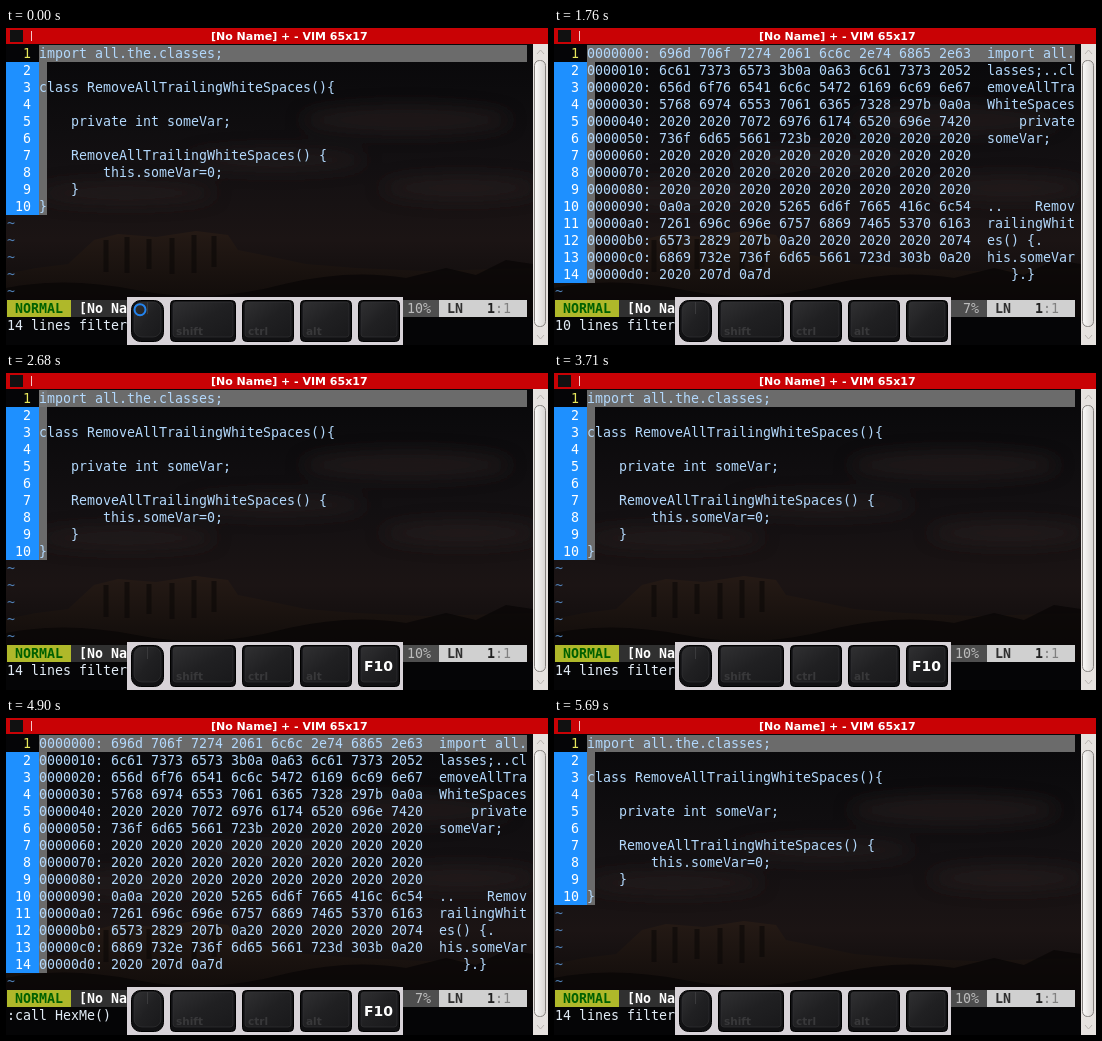
An HTML page for the animation above (5880 ms loop, 542 by 317 pixels).

```html
<!DOCTYPE html>
<html lang="en">
<head>
<meta charset="utf-8">
<title>Hex view toggle</title>
<style>
html, body { margin: 0; width: 100%; height: 100%; overflow: hidden; background: #000; }
svg { display: block; }
.mono { font: 13.29px "DejaVu Sans Mono", monospace; }
.bold { font-weight: bold; }
.sans { font: bold 11px "DejaVu Sans", sans-serif; }
</style>
</head>
<body>
<svg id="stage" width="542" height="317" viewBox="0 0 542 317">
  <defs>
    <linearGradient id="sky" x2="0" y2="1">
      <stop offset="0" stop-color="#08080a"/>
      <stop offset=".45" stop-color="#131012"/>
      <stop offset=".72" stop-color="#1b1414"/>
      <stop offset="1" stop-color="#0b0909"/>
    </linearGradient>
    <linearGradient id="cliff" x2="0" y2="1">
      <stop offset="0" stop-color="#251a15"/>
      <stop offset="1" stop-color="#0c0908"/>
    </linearGradient>
    <linearGradient id="cap" x2="1" y2="1">
      <stop offset="0" stop-color="#303032"/>
      <stop offset=".5" stop-color="#202022"/>
      <stop offset="1" stop-color="#19191b"/>
    </linearGradient>
    <linearGradient id="thumb">
      <stop offset="0" stop-color="#fbfaf9"/>
      <stop offset="1" stop-color="#d9d6d3"/>
    </linearGradient>
    <filter id="soft" x="-30%" y="-50%" width="160%" height="200%"><feGaussianBlur stdDeviation="9"/></filter>
  </defs>

  <rect width="542" height="317" fill="#000"/>
  <g id="scene">
    <rect y="16" width="527" height="273" fill="url(#sky)"/>
    <g filter="url(#soft)" fill="#2a2222" opacity=".6">
      <ellipse cx="400" cy="92" rx="105" ry="13"/>
      <ellipse cx="270" cy="132" rx="90" ry="10"/>
      <ellipse cx="455" cy="160" rx="80" ry="11"/>
      <ellipse cx="120" cy="165" rx="90" ry="10"/>
    </g>
    <path d="M0 246L30 240 62 236 88 212 112 206 150 209 190 203 222 207 232 222 262 228 300 236 350 240 420 243 527 240V289H0Z" fill="url(#cliff)"/>
    <path d="M100 212v32M121 209v36M143 211v30M166 210v36M188 207v38M208 208v31" stroke="#0b0807" stroke-width="5" opacity=".6"/>
    <path d="M0 260Q60 248 130 262T270 258 400 250L440 240 470 247 500 232 527 236V289H0Z" fill="#080606" opacity=".75"/>
  </g>

  <rect width="542" height="16" fill="#c90205"/>
  <rect x="4" y="2" width="13" height="12" fill="#111"/>
  <path d="M25.5 3v10" stroke="#f4c8c8"/>
  <text class="sans" x="205" y="12" fill="#fff">[No Name] + - VIM 65x17</text>

  <rect x="33" y="17" width="488" height="17" fill="#6b6b6b"/>
  <rect id="cursor" x="33" y="17" width="8" height="17" fill="#747474"/>
  <rect y="16" width="33" height="18" fill="#050507"/>
  <g id="views"></g>

  <rect x="1" y="272" width="64" height="17" fill="#afb82a"/>
  <rect x="65" y="272" width="368" height="17" fill="#4e4e4e"/>
  <rect x="65" y="272" width="58" height="17" fill="#303030"/>
  <rect x="433" y="272" width="88" height="17" fill="#d0d0d0"/>
  <rect y="289" width="527" height="28" fill="#050506"/>
  <g id="status"></g>

  <rect x="527" y="16" width="15" height="301" fill="#e6e2df"/>
  <rect x="528.5" y="32.5" width="11" height="266" rx="5" fill="url(#thumb)" stroke="#85817e"/>
  <path d="M531 26l3.500-4 3.500 4M531 307l3.500 4 3.500-4" fill="none" stroke="#bbb6b2"/>

  <rect x="121" y="269" width="276" height="48" fill="#d8d3d8"/>
  <g id="keys"></g>
  <path d="M141.500 274v12" stroke="#3a3a3c"/>
  <circle id="click" cx="134" cy="281.700" r="5.500" fill="none" stroke="#2484ee" stroke-width="2"/>
  <text id="pressed" class="sans" x="372.500" y="298" text-anchor="middle" fill="#fff" style="font-size:14px">F10</text>
</svg>
<script>
const LOOP = 5880, CELL = 8, ROW = 17;
const $ = id => document.getElementById(id);

function add(parent, tag, attrs, text) {
  const el = document.createElementNS('http://www.w3.org/2000/svg', tag);
  for (const k in attrs) el.setAttribute(k, attrs[k]);
  if (text) el.textContent = text;
  return parent.appendChild(el);
}

// Each word sits on the terminal grid.
function mono(parent, str, col, row, fill, bold) {
  const line = add(parent, 'text', { class: bold ? 'mono bold' : 'mono', y: 13 + ROW * row, fill });
  for (const m of str.matchAll(/\S+/g))
    add(line, 'tspan', { x: 1 + CELL * (col + m.index) }, m[0]);
  return line;
}

const name = 'RemoveAllTrailingWhiteSpaces';
const code = `import all.the.classes;\n\nclass ${name}(){\n\n    private int someVar;` +
  ' '.repeat(56) + `\n\n    ${name}() {\n        this.someVar=0;\n    }\n}`;

function hexDump(str) {
  const lines = [];
  for (let i = 0; i < str.length; i += 16) {
    const part = str.slice(i, i + 16);
    const hex = [...part].map((c, k) =>
      c.charCodeAt(0).toString(16).padStart(2, '0') + (k % 2 ? ' ' : '')).join('');
    lines.push(i.toString(16).padStart(7, '0') + ': ' + hex.padEnd(41) + part.replace(/\n/g, '.').slice(0, 11));
  }
  return lines;
}

function makeView(lines, percent) {
  const g = add($('views'), 'g', {}), n = lines.length;
  add(g, 'rect', { y: 34, width: 33, height: ROW * (n - 1), fill: '#1e90ff' });
  add(g, 'rect', { x: 33, y: 34, width: CELL, height: ROW * (n - 1), fill: '#6b6b6b' });
  lines.forEach((s, i) => {
    mono(g, String(i + 1).padStart(3), 0, i + 1, i ? '#fff' : '#e6e65a');
    mono(g, s, 4, i + 1, '#b2d8fc');
  });
  for (let r = n + 1; r < 16; r++) mono(g, '~', 0, r, '#4f7fb5');
  const pct = mono($('status'), percent.padStart(3), 50, 16, '#bcbcbc');
  const msg = mono($('status'), (n === 10 ? 14 : 10) + ' lines filter', 0, 17, '#e2ecf6');
  return { g, pct, msg };
}

const text = makeView(code.split('\n'), '10%');
const hex = makeView(hexDump(code), '7%');
const status = $('status');
const call = mono(status, ':call HexMe()', 0, 17, '#e2ecf6');
mono(status, 'NORMAL', 1, 16, '#006000', true);
mono(status, '[No Na', 9, 16, '#fff', true);
mono(status, 'LN', 55, 16, '#303030', true);
mono(status, '1', 60, 16, '#202020', true);
mono(status, ':1', 61, 16, '#808080');

[[125, 33, ''], [164, 66, 'shift'], [236, 52, 'ctrl'], [294, 52, 'alt'], [352, 42, '']].forEach(([x, w, label]) => {
  const r = label || x > 300 ? 4 : 9;
  add($('keys'), 'rect', { x: x + .5, y: 272.5, width: w - 1, height: 41, rx: r, fill: '#111113', stroke: '#000' });
  add($('keys'), 'rect', { x: x + 3, y: 274, width: w - 6, height: 35, rx: r - 1, fill: 'url(#cap)', stroke: '#343436', 'stroke-width': .6 });
  if (label) add($('keys'), 'text', { class: 'sans', x: x + 6, y: 307, fill: '#38383a', style: 'font-size:10.5px' }, label);
});

const during = (t, spans) => spans.some(([a, b]) => t >= a && t < b);
const show = (el, on) => el.setAttribute('visibility', on ? 'visible' : 'hidden');

const hexTimes = [[1200, 2680], [3790, 5150]];
const callTimes = [[1160, 1200], [2640, 2680], [3750, 3790], [4900, 5150]];
const keyTimes = [[1080, 1760], [2600, 3260], [3710, 4390], [4820, 5430]];
const cursorTimes = [[420, 1020], [1200, 1760], [2340, 2640], [2680, 3220], [3790, 4340], [5150, 5690]];

function draw(t) {
  const isHex = during(t, hexTimes), calling = during(t, callTimes);
  for (const [view, on] of [[text, !isHex], [hex, isHex]]) {
    show(view.g, on);
    show(view.pct, on);
    show(view.msg, on && !calling);
  }
  show(call, calling);
  show($('pressed'), during(t, keyTimes));
  show($('cursor'), during(t, cursorTimes));
  show($('click'), t < 220);
}

const start = performance.now();
function tick(now) {
  draw(Math.max(0, now - start) % LOOP);
  requestAnimationFrame(tick);
}
draw(0);
requestAnimationFrame(tick);
</script>
</body>
</html>
```
